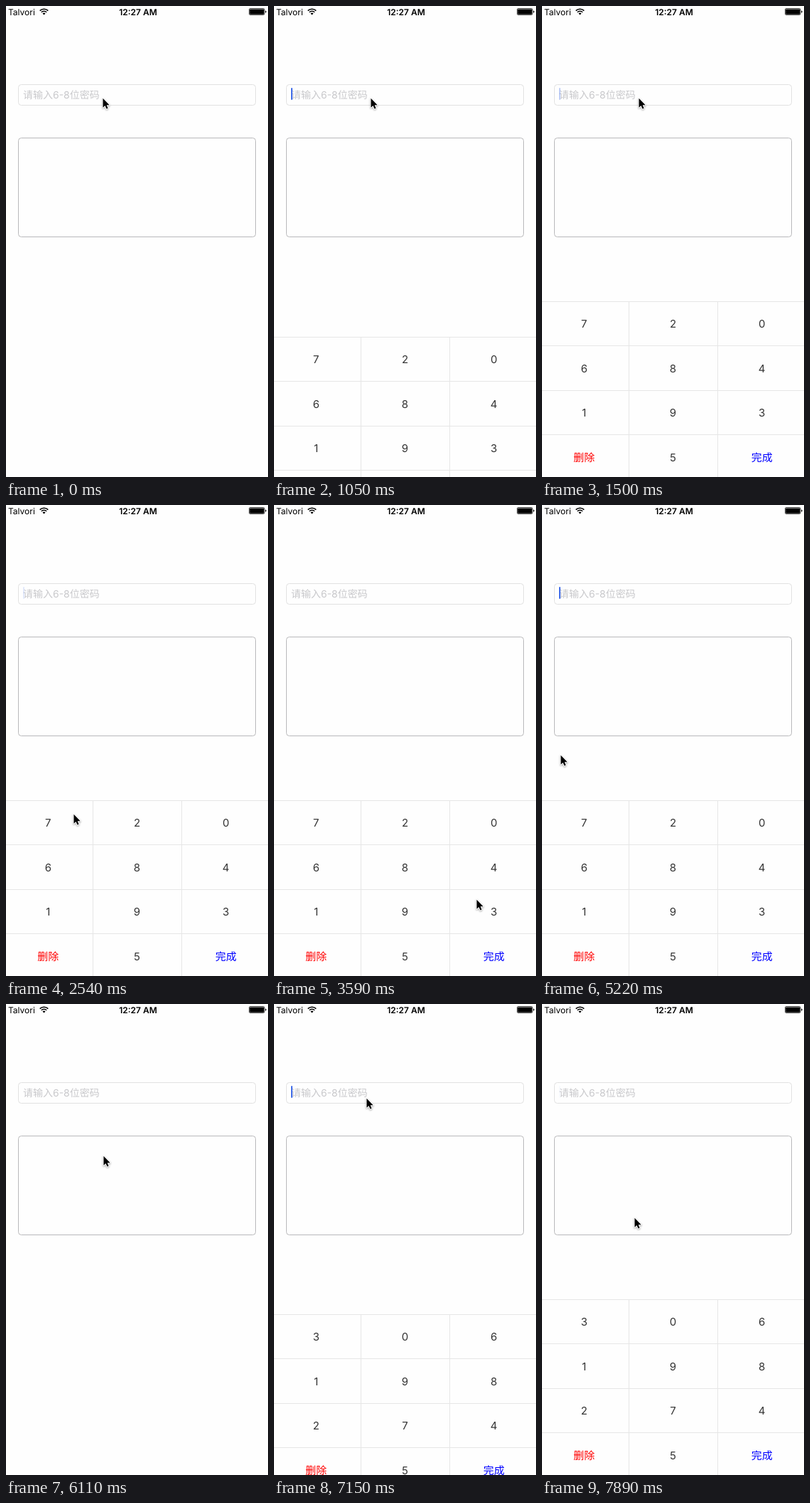
An HTML page for the animation above (8 s loop, 369 px wide and 662 px high).

```html
<!DOCTYPE html>
<html lang="zh-CN">
<head>
<meta charset="utf-8">
<title>Shuffled keypad</title>
<style>
  html, body { margin: 0; width: 100%; height: 100%; overflow: hidden; background: #fefefe; }
  svg { display: block; width: 369px; height: 662px; }
  text { font-family: Inter, "Noto Sans CJK SC", "Noto Sans CJK", sans-serif; text-rendering: geometricPrecision; }
  .status { font-size: 12px; }
  .hint { font-size: 14px; fill: #c8c8cb; }
  .key { font-size: 15px; fill: #333; text-anchor: middle; }
  .box { fill: none; }
  .arrow { stroke: #fff; stroke-width: 2; stroke-linejoin: round; paint-order: stroke;
           filter: drop-shadow(0 1px 1px rgba(0, 0, 0, .35)); }
</style>
</head>
<body>
<svg viewBox="0 0 369 662" lang="zh-CN">
  <text class="status" x="3" y="12.6">Talvori</text>
  <g fill="none" stroke="#000" stroke-width="1.6">
    <path d="M47.7 6.6a8.2 8.2 0 0 1 11.6 0M49.8 8.8a5.2 5.2 0 0 1 7.4 0"/>
    <path d="M53.5 12.6l-2-2.1a2.8 2.8 0 0 1 4 0z" fill="#000" stroke="none"/>
  </g>
  <text class="status" x="186" y="12.6" text-anchor="middle" font-weight="600">12:27 AM</text>
  <rect x="342.5" y="3.5" width="21.5" height="9" rx="1.5" fill="none" stroke="#000" stroke-opacity=".7"/>
  <rect x="343.2" y="4.4" width="20.2" height="7.4" rx=".8"/>
  <path d="M365.2 6.5q1.5.3 1.5 1.6t-1.5 1.6z"/>

  <rect class="box" x="17.5" y="110.5" width="334" height="29" rx="4" stroke="#e1e1e1"/>
  <text class="hint" x="24" y="129.8">请输入6-8位密码</text>
  <rect id="caret" x="24" y="115" width="2" height="17" rx="1" fill="#3f6be8"/>
  <rect class="box" x="17.5" y="185.5" width="334" height="139" rx="4" stroke="#b9b9bb"/>

  <g id="pad">
    <rect y="415" width="369" height="247" fill="#fefefe"/>
    <path d="M0 415.5H369M0 477.5H369M0 540.5H369M0 602.5H369M122.5 415V662M247.5 415V662"
          fill="none" stroke="#e6e6e6"/>
  </g>
  <path id="cursor" class="arrow" d="M0 0V13L3 10.2 5 14.8 7.1 13.9 5.2 9.4H9.2Z"/>
</svg>
<script>
const LOOP = 8000, PAD_HEIGHT = 247;
const FIRST_TICK = 895, TICK = 148.7;
const $ = id => document.getElementById(id);

// Where the pointer rests or turns.
const stops = [
  { at: 1800, x: 136, y: 129 },
  { at: 2530, x: 95, y: 434 },
  { at: 2980, x: 176, y: 432 },
  { at: 3600, x: 290, y: 560 },
  { at: 4160, x: 145, y: 598 },
  { at: 4460, x: 78, y: 407 },
  { at: 5220, x: 25, y: 350 },
  { at: 5800, x: 25, y: 350 },
  { at: 6100, x: 137, y: 213 },
  { at: 6690, x: 130, y: 132 },
  { at: 7300, x: 130, y: 132 },
  { at: 7880, x: 130, y: 300 }
];

// Each time the field is focused, the keys come in a new order.
const sessions = [
  { open: 880, close: 5786, blink: 880, keys: "7206841935" },
  { open: 6915, close: Infinity, blink: 7000, keys: "3061982745" }
];

const labels = Array.from({ length: 12 }, (_, i) => {
  const label = document.createElementNS("http://www.w3.org/2000/svg", "text");
  label.setAttribute("class", "key");
  label.setAttribute("x", 59.3 + 125.2 * (i % 3));
  label.setAttribute("y", 452.3 + 62.4 * Math.floor(i / 3));
  return $("pad").appendChild(label);
});
labels[9].style.fill = "#f00";
labels[11].style.fill = "#00f";

function showKeys(keys) {
  const names = [...keys.slice(0, 9), "删除", keys[9], "完成"];
  labels.forEach((label, i) => label.textContent = names[i]);
}

// Critically damped spring from 0 to 1.
function spring(ms) {
  const x = Math.max(0, ms) * 0.01826;
  return 1 - (1 + x) * Math.exp(-x);
}

function pointerAt(t) {
  const next = stops.findIndex(stop => stop.at >= t);
  if (next < 1) return next ? stops.at(-1) : stops[0];
  const a = stops[next - 1], b = stops[next];
  const p = (t - a.at) / (b.at - a.at);
  return { x: a.x + (b.x - a.x) * p, y: a.y + (b.y - a.y) * p };
}

// On, fading out, off, then fading in again.
function caretAlpha(ms) {
  const phase = Math.max(0, ms) % 990;
  if (phase < 430) return 1;
  return Math.max(0, (700 - phase) / 270, (phase - 880) / 110);
}

let shown;
function draw(t) {
  const session = t < 6500 ? sessions[0] : sessions[1];
  if (shown !== session) showKeys((shown = session).keys);

  const focused = t >= session.open && t < session.close;
  const rise = focused ? spring(t - session.open) : 1 - spring(t - session.close);
  const visible = t >= session.open && t < session.close + 300;
  const offset = Math.round(PAD_HEIGHT * (1 - rise));
  $("pad").setAttribute("transform", `translate(0 ${offset})`);
  $("pad").style.display = visible ? "" : "none";
  $("caret").style.opacity = focused ? caretAlpha(t - session.blink) : 0;

  const { x, y } = pointerAt(t);
  $("cursor").setAttribute("transform", `translate(${Math.round(x) + 0.5} ${Math.round(y) + 0.8})`);
}

// The screen refreshes only at regular ticks.
function lastTick(t) {
  return t < FIRST_TICK ? 0 : t - (t - FIRST_TICK) % TICK;
}

const start = performance.now();
function frame() {
  draw(lastTick((performance.now() - start) % LOOP));
  requestAnimationFrame(frame);
}
frame();
</script>
</body>
</html>
```
